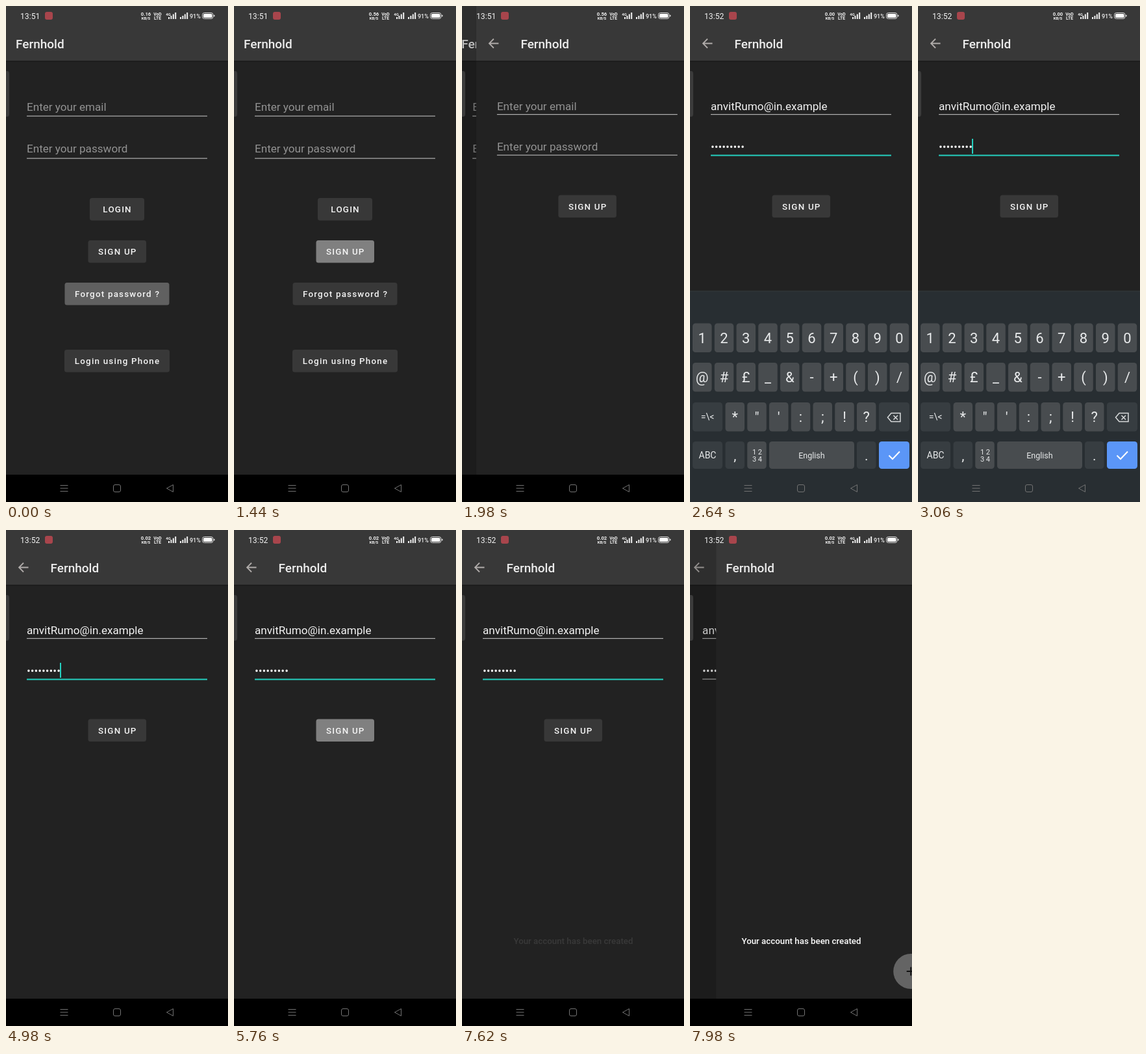
These frames come from a looping animation (342x762 px, 8000 ms). An HTML page:

```html
<!DOCTYPE html>
<html lang="en">
<head>
<meta charset="utf-8">
<title>Sign-up flow</title>
<style>
  html, body { margin: 0; width: 100%; height: 100%; overflow: hidden; background: #222; }
  svg { display: block; width: 342px; height: 762px; font-family: Roboto, sans-serif; }
  .m { text-anchor: middle; }
  .title { font-size: 19px; font-weight: 500; fill: #ececec; }
  .field { font-size: 17.1px; fill: #929292; }
  .typed { fill: #f2f2f2; }
  .btn { font-size: 13.4px; font-weight: 500; letter-spacing: 1.2px; fill: #f4f4f4; text-anchor: middle; }
  .key { fill: #e8eaeb; text-anchor: middle; }
</style>
</head>
<body>
<svg id="stage" viewBox="0 0 342 762"></svg>
<script>
const LOOP = 8000, STEP = 60, W = 342;
const APP = 'Fernhold', EMAIL = 'anvitRumo@in.example';
const LINE = '#b0b0b0', TEAL = '#25d0c0';

const rect = (x, y, w, h, fill, r = 0, more = '') =>
  `<rect x="${x}" y="${y}" width="${w}" height="${h}" rx="${r}" fill="${fill}" ${more}/>`;
const text = (x, y, s, cls = '', more = '') => `<text x="${x}" y="${y}" class="${cls}" ${more}>${s}</text>`;
const path = (d, stroke, width = 1, more = '') =>
  `<path d="${d}" fill="none" stroke="${stroke}" stroke-width="${width}" ${more}/>`;
const group = (id, inner) => `<g id="${id}">${inner}</g>`;
const button = (x, y, w, label, id = '') =>
  rect(x, y, w, 34.5, '#383838', 3.5, id && `id="${id}"`) + text(x + w / 2 + 0.6, y + 22, label, 'btn');
const underline = (y, id = '') => rect(32, y, 278, 1.2, LINE, 0, id && `id="${id}"`);

// A page with its bar; the shade darkens it while another page covers it.
const page = (id, titleX, inner) => group(id,
  rect(0, 0, W, 762, '#222') + rect(0, 84, W, 2, '#1d1d1d') + rect(0, 0, W, 84, '#383838') +
  text(titleX, 65, APP, 'title') + inner +
  rect(0, 0, W + 30, 762, '#000', 0, `id="${id}Shade" opacity="0"`));

const home = page('home', 15,
  text(32, 161, 'Enter your email', 'field') + underline(168.5) +
  text(32, 225, 'Enter your password', 'field') + underline(233.5) +
  button(129, 295, 84, 'LOGIN') +
  button(126.5, 360, 89.5, 'SIGN UP', 'homeSign') +
  button(90.5, 425, 161, 'Forgot password ?', 'forgot') +
  button(90, 528, 162, 'Login using Phone'));

const signup = page('signup', 68.5,
  path('M34.5 57.5H20.5M27 50.5L20 57.5L27 64.5', '#b0acaa', 1.8) +
  group('hints', text(32, 160, 'Enter your email', 'field') + text(32, 222, 'Enter your password', 'field')) +
  group('filled', text(32, 160, EMAIL, 'field typed') + text(32, 222, '•'.repeat(9), 'field typed')) +
  underline(166) + underline(228.5, 'passLine') +
  rect(83, 204, 2, 23, TEAL, 0, 'id="cursor"') +
  button(126.5, 290.5, 89.5, 'SIGN UP', 'sign'));

const last = page('last', 15,
  '<circle cx="300" cy="678" r="27" fill="#646464"/>' + path('M293.5 678H306.5M300 671.5V684.5', '#111', 2));

function keyboard() {
  const NORMAL = '#484c4f', SPECIAL = '#373d41';
  const key = (x, y, w, label, fill = NORMAL, size = 22, h = 44.5) =>
    rect(x, y, w, h, fill, 4.5) +
    text(x + w / 2, y + h / 2 + size * 0.36, label, 'key', `font-size="${size}"`);
  const row = (x, y, labels) => labels.split(' ').map((s, i) => key(x + 33.75 * i, y, 29.5, s)).join('');
  return rect(0, 438, W, 340, '#282e32') + rect(0, 437.5, W, 1, '#343a3d') +
    row(4, 487.5, '1 2 3 4 5 6 7 8 9 0') +
    row(4, 548, '@ # £ _ &amp; - + ( ) /') +
    key(4, 609, 46, '=\\&lt;', SPECIAL, 14) +
    row(54.5, 609, '* " \' : ; ! ?') +
    key(291, 609, 47, '', SPECIAL) +
    path('M304.5 632L310 625.5H324V638.5H310ZM313.5 629L320 635.5M320 629L313.5 635.5', '#d8dadb', 1.5) +
    key(4, 669, 46, 'ABC', SPECIAL, 14, 42) +
    key(54.5, 669, 29.5, ',', SPECIAL, 21, 42) +
    key(88.2, 669, 29.5, '', NORMAL, 11, 42) +
    text(103.5, 689, '1 2', 'key', 'font-size="11"') + text(103.5, 700, '3 4', 'key', 'font-size="11"') +
    key(122, 669, 131, 'English', NORMAL, 12.5, 42) +
    key(257, 669, 29.5, '.', SPECIAL, 21, 42) +
    key(291, 669, 47, '', '#5b96f7', 14, 42) +
    path('M306.5 690.5L312 696L323 684.5', '#fff', 2);
}

const nav =
  group('touch', '<path d="M212 720H294Q304 726 304 741T294 762H212Q202 756 202 741T212 720" fill="#fff" opacity=".09"/>' +
    '<circle cx="270" cy="754.5" r="10.5" fill="#999" opacity=".8"/>') +
  path('M83.5 736.5H95.5M83.5 741H95.5M83.5 745.5H95.5', '#727272') +
  rect(165.5, 735.5, 11, 11, 'none', 2.5, 'stroke="#727272"') +
  path('M247.5 741L257.5 735.5V746.5Z', '#727272');

const bars = x => [3, 5, 7.5, 10].map((h, i) => rect(x + 3.4 * i, 20 - h, 2, h, '#f2f2f2')).join('');
const small = (x, y, s, size, more = '') =>
  text(x, y, s, 'm', `font-size="${size}" font-weight="700" ${more}`);
const status = `<g fill="#f2f2f2">` +
  text(22, 19.5, '', '', 'id="clock" font-size="12.2"') +
  rect(60, 9, 12, 12, '#a8454c', 3) +
  small(215.5, 15, '', 7.7, 'id="speed"') + small(215.5, 21, 'KB/S', 6) +
  small(233.5, 15, 'VoD', 6.8) + small(233.5, 20.6, 'LTE', 6.8) +
  small(250, 15, '4G', 6) + bars(250) + bars(268) +
  text(283, 18.5, '91%', '', 'font-size="9" font-weight="500"') +
  rect(302.5, 10.5, 16.5, 9, 'none', 3, 'stroke="#ddd"') + rect(304, 12, 13.5, 6, '#fff', 1.5) +
  rect(320, 13.5, 1.5, 3, '#ddd', 0.7) + '</g>';

document.getElementById('stage').innerHTML =
  home + signup + last +
  '<path d="M0 100H2Q5 100 5 104V166Q5 170 2 170H0Z" fill="#3b3b3b"/>' +
  rect(0, 720, W, 42, '#000') + group('keyboard', keyboard()) + nav +
  text(171.5, 636, 'Your account has been created', 'm',
    'id="toast" font-size="13.3" font-weight="500" fill="#fff"') +
  status;

const $ = id => document.getElementById(id);
const set = (id, name, value) => $(id).setAttribute(name, value);
const show = (id, on) => set(id, 'visibility', on ? 'inherit' : 'hidden');
const ramp = (t, a, b) => Math.min(1, Math.max(0, (t - a) / (b - a)));
const gray = v => `rgb(${v},${v},${v})`;
const press = (id, amount) => set(id, 'fill', gray(Math.round(56 + 72 * amount)));

// The new page eases in from the right; the old one drifts left and dims.
function slide(from, to, t, start) {
  const p = 1 - (1 - ramp(t, start, start + 600)) ** 3;
  show(to, p > 0);
  set(to, 'transform', `translate(${W * (1 - p)})`);
  if (p > 0) set(from, 'transform', `translate(${-20 * p ** 3.5})`);
  set(from + 'Shade', 'opacity', 0.2 * p);
}

function draw(t) {
  const typed = t >= 2640;
  slide('home', 'signup', t, 1620);
  if (t < 1620) set('home', 'transform', '');
  slide('signup', 'last', t, 7674);

  set('forgot', 'fill', t < 60 ? '#606060' : '#383838');
  press('homeSign', (t >= 1440 ? 1 : t >= 1320 ? 0.5 : 0) * (1 - ramp(t, 1620, 2040)));
  press('sign', ramp(t, 5400, 5640) * (1 - ramp(t, 5790, 6060)));

  show('hints', !typed);
  show('filled', typed);
  const focused = typed && t < 7674;
  set('passLine', 'fill', focused ? TEAL : LINE);
  set('passLine', 'height', focused ? 2 : 1.2);
  show('cursor', focused && Math.floor((t - 3060) / 475) % 2 === 0);

  const close = ramp(t, 4200, 4500);
  show('keyboard', typed && close < 1);
  set('keyboard', 'transform', `translate(0 ${324 * close ** 1.54})`);
  set('keyboard', 'opacity', Math.max(0, 1 - 1.3 * close));
  set('touch', 'opacity', ramp(t, 4020, 4140) * (1 - ramp(t, 4360, 4660)));

  set('toast', 'opacity', ramp(t, 7600, 7800));
  $('clock').textContent = typed ? '13:52' : '13:51';
  $('speed').textContent = t < 1320 ? '0.16' : !typed ? '0.56' : t < 4980 ? '0.00' : '0.02';
}

const begin = performance.now();
function tick() {
  const t = (performance.now() - begin) % LOOP;
  draw(Math.floor(t / STEP) * STEP);
  requestAnimationFrame(tick);
}
tick();
</script>
</body>
</html>
```
